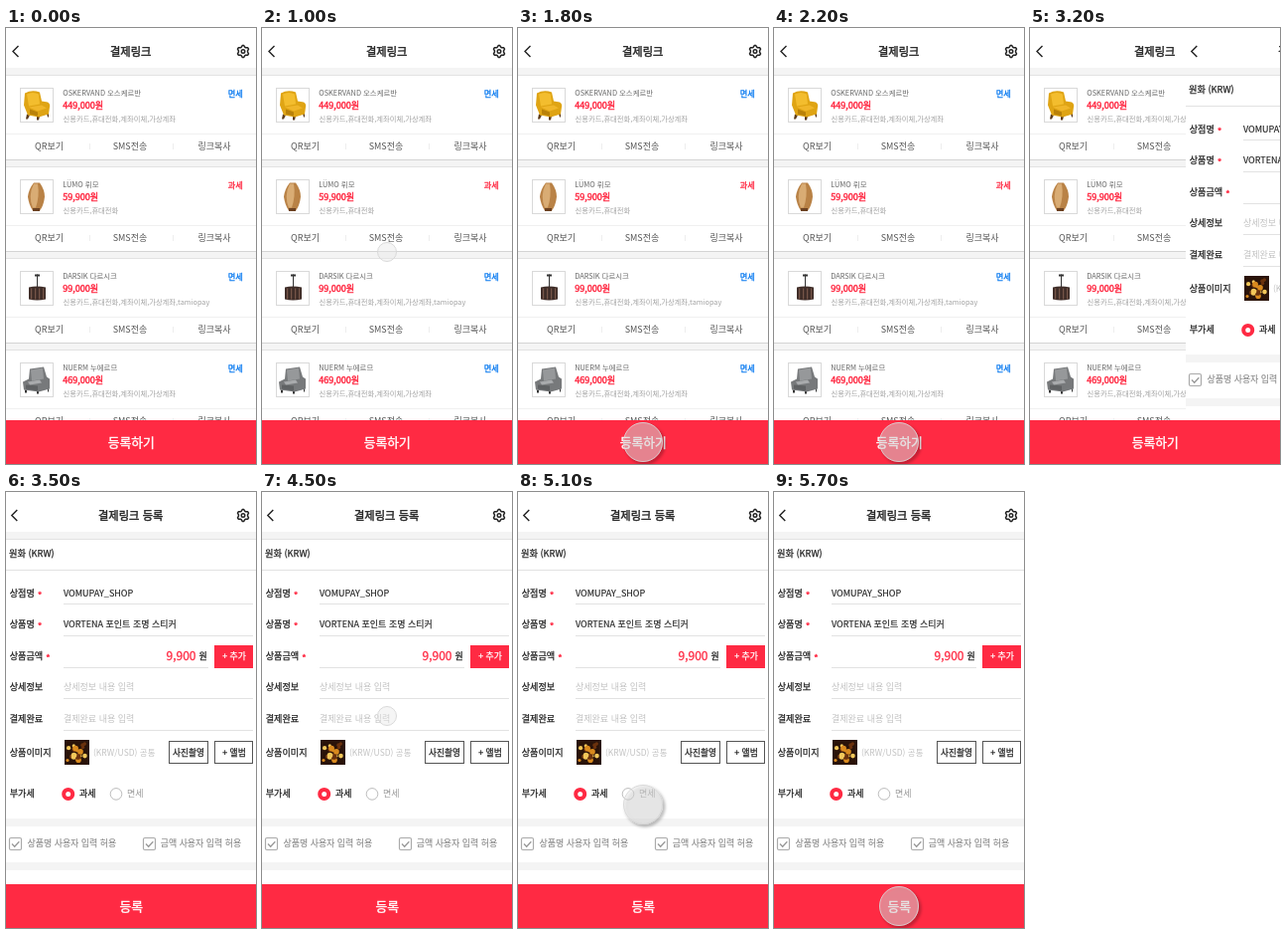
Recreate the animation shown at these times as an HTML page. Size 252 px wide and 438 px high, loop 7.2 s.

```html
<!DOCTYPE html>
<html lang="ko">
<head>
<meta charset="utf-8">
<title>결제링크</title>
<style>
  html, body { margin: 0; width: 100%; height: 100%; overflow: hidden; background: #fff; }
  svg { display: block; width: 252px; height: 438px; overflow: hidden; }
  text { font-family: "Noto Sans CJK KR", "Noto Sans CJK", "Noto Sans CJK JP", "Noto Sans", sans-serif; white-space: pre; }
</style>
</head>
<body>
<svg id="stage" viewBox="0 0 252 438" xmlns="http://www.w3.org/2000/svg">
  <defs>
    <filter id="shade" x="-30%" y="-30%" width="170%" height="170%">
      <feDropShadow dx="2" dy="2.2" stdDeviation="1.5" flood-color="#000" flood-opacity=".5"/>
    </filter>
  </defs>
  <g id="list"></g>
  <g id="form"></g>
  <circle id="tap" cx="126" fill="#e6e6e6" fill-opacity=".42" stroke="#d6d6d6" stroke-opacity=".9"/>
</svg>
<script>
const RED = '#ff2a43', BLUE = '#0f7df0', INK = '#222', GRAY = '#999', PALE = '#c2c2c2', RULE = '#e2e2e2', BAND = '#f4f4f4';
const $ = id => document.getElementById(id);

const rect = (x, y, w, h, fill, more = '') =>
  `<rect x="${x}" y="${y}" width="${w}" height="${h}" fill="${fill}" ${more}/>`;
const path = (d, stroke, width = 1) =>
  `<path d="${d}" fill="none" stroke="${stroke}" stroke-width="${width}"/>`;
const shape = (d, fill) => `<path d="${d}" fill="${fill}"/>`;
const dot = (x, y, r, fill, more = '') => `<circle cx="${x}" cy="${y}" r="${r}" fill="${fill}" ${more}/>`;
const box = (x, y, w, h, stroke) => rect(x + .5, y + .5, w - 1, h - 1, '#fff', `stroke="${stroke}"`);
const rule = (x, y, w, color = RULE) => rect(x, y, w, 1, color);

// y is the vertical middle of the glyphs; heft thickens the regular weight
const text = (x, y, size, str, fill = INK, heft = 0, anchor = 'start') =>
  `<text x="${x}" y="${(y + size * .37).toFixed(2)}" font-size="${size}" fill="${fill}" stroke="${fill}" stroke-width="${heft}" text-anchor="${anchor}">${str}</text>`;
const mid = (x, y, size, str, fill, heft) => text(x, y, size, str, fill, heft, 'middle');

function gear(cx, cy) {
  const pts = [];
  for (let i = 0; i < 24; i++) {
    const a = (i - .5) * Math.PI / 12, r = i % 4 < 2 ? 6 : 4.6;
    pts.push((cx + r * Math.sin(a)).toFixed(2) + ' ' + (cy - r * Math.cos(a)).toFixed(2));
  }
  return `<path d="M${pts.join('L')}Z" fill="none" stroke="${INK}" stroke-width="1.5" stroke-linejoin="round"/>` +
    dot(cx, cy, 1.8, 'none', `stroke="${INK}" stroke-width="1.4"`);
}

const header = (title, backX) =>
  path(`M${backX + 5.5} 18l-5.5 5.5l5.5 5.5`, INK, 1.4) + mid(125.7, 23.4, 11.3, title, INK, .4) + gear(239, 23.5) +
  rect(0, 40, 252, 7, BAND) + rule(0, 47, 252);

const bar = label => rect(0, 394, 252, 44, RED) + mid(126.2, 416.5, 12.8, label, '#fff', .4);

// product pictures, drawn in a 34px square
const pictures = [
  shape('M7 26L6 31H8L10 27ZM17 28V32H19L20 28ZM27 25L28 29H29V24Z', '#5b3a1c') +
  shape('M5 5Q12 1 20 4L22 13L28 14Q31 16 30 19L29 26L19 29L8 27L4 17Z', '#dfa414') +
  shape('M7 6Q13 3 19 6L20 16L9 18Z', '#f3bd2e') + shape('M9 19L22 17L27 20L18 23Z', '#f0b62a') +
  shape('M10 21L18 24V28L10 26Z', '#b98109'),
  shape('M14 3H20Q25 10 25 17Q24 26 20 31H13Q9 25 8 17Q9 9 14 3Z', '#b98246') +
  shape('M14 4H18Q20 16 16 28H13Q8 16 14 4Z', '#d9ac74') + rect(13, 28.5, 7, 3, '#6b4020'),
  rect(17, 3, 1, 13, '#333') + rect(15, 3, 5, 2, '#333') +
  shape('M9 16Q17 14 26 16V28Q17 30 9 28Z', '#3f2d28') +
  [11, 15, 19, 23].map(x => rect(x, 17, 1.2, 11, '#765548')).join(''),
  shape('M5 27V30H7V27ZM17 28V31H19V28ZM28 25V29H29V24Z', '#333') +
  shape('M10 6L24 4L27 14L30 16V26L19 29L4 27L3 19L9 16Z', '#77797b') +
  shape('M11 7L23 5L24 16L12 18Z', '#96989a') + shape('M8 19L20 17L22 20L10 22Z', '#a9abad') +
  shape('M6 22L18 23V28L6 26Z', '#5f6163')
];

const items = [
  ['OSKERVAND 오스케르반', '449,000', '신용카드,휴대전화,계좌이체,가상계좌', true],
  ['LÜMO 뤼모', '59,900', '신용카드,휴대전화', false],
  ['DARSIK 다르시크', '99,000', '신용카드,휴대전화,계좌이체,가상계좌,tamiopay', true],
  ['NUERM 누에르므', '469,000', '신용카드,휴대전화,계좌이체,가상계좌', true]
];

const card = ([name, price, ways, free], i) => `<g transform="translate(0 ${i * 92})">` +
  box(14, 60, 34, 35, '#d9d9d9') + `<g transform="translate(14 60.5)">${pictures[i]}</g>` +
  text(57.2, 65, 7.4, name, '#666') +
  text(57.3, 77.3, 9, price + '원', RED, .45) +
  text(57.5, 91, 7.3, ways, '#a2a2a2') +
  text(223.8, 66, 8.2, free ? '면세' : '과세', free ? BLUE : RED, .3) +
  rule(0, 106, 252, '#f0f0f0') +
  rect(84, 116, 1, 6, '#eee') + rect(168, 116, 1, 6, '#eee') +
  mid(43.5, 118.7, 9, 'QR보기', '#555') + mid(125, 118.7, 9, 'SMS전송', '#555') + mid(210, 118.7, 9, '링크복사', '#555') +
  rect(0, 132, 252, 7, BAND) + rule(0, 132, 252, '#d4d4d4') + rule(0, 139, 252) + '</g>';

const listScreen = () => rect(0, 0, 252, 438, '#fff') + header('결제링크', 7) +
  items.map(card).join('') + bar('등록하기');

const label = (y, str, star) => text(3.7, y, 9.1, str, INK, .25) +
  (star ? text(star, y + 1.6, 9, '*', RED, .4) : '');
const field = (y, str, fill = INK) => text(58, y, 9, str, fill, fill === INK ? .15 : 0);
const check = (x, str, tx) =>
  rect(x + .5, 347.5, 12, 12, '#fff', 'stroke="#aaa" stroke-width="1.2" rx="1.5"') +
  path(`M${x + 3} 353.5l2.7 2.8l4.6-5`, '#999', 1.3) + text(tx, 353, 8.95, str, '#888', .1);

function lights() {
  let seed = 7, out = rect(59, 249, 25, 25, '#2a1309');
  const rnd = () => (seed = seed * 16807 % 2147483647) / 2147483647;
  for (let i = 0; i < 18; i++)
    out += dot((62 + rnd() * 19).toFixed(1), (252 + rnd() * 19).toFixed(1), (1 + rnd() * 2).toFixed(1),
      ['#d98a1e', '#6b320e', '#f2c75a'][i % 3]);
  return out;
}

const formScreen = () => rect(0, 0, 252, 438, '#fff') + header('결제링크 등록', 5.8) +
  text(3, 62, 9.2, '원화 (KRW)', INK, .25) + rule(0, 78, 252) +
  label(102, '상점명', 32) + field(102, 'VOMUPAY_SHOP') + rule(58, 112, 191) +
  label(133, '상품명', 32) + field(133, 'VORTENA 포인트 조명 스티커') + rule(58, 144, 191) +
  label(165, '상품금액', 40.2) + text(191.5, 165, 12, '9,900', RED, .3, 'end') +
  text(194.5, 165, 9, '원', INK, .25) + rule(58, 176, 146) +
  rect(210, 154, 39, 23, RED) + mid(230, 165.2, 8.8, '+ 추가', '#fff', .25) +
  label(196, '상세정보') + field(196, '상세정보 내용 입력', PALE) + rule(58, 207, 191) +
  label(228, '결제완료') + field(228, '결제완료 내용 입력', PALE) + rule(58, 239, 191) +
  label(262, '상품이미지') + lights() + text(88, 261.5, 8.5, '(KRW/USD) 공통', PALE) +
  box(164, 250, 40, 23, '#555') + mid(184, 261.5, 8.7, '사진촬영', INK, .25) +
  box(210, 250, 39, 23, '#555') + mid(230, 261.5, 8.8, '+ 앨범', INK, .25) +
  label(303, '부가세') +
  dot(62.7, 303.4, 4.5, '#fff', `stroke="${RED}" stroke-width="4"`) + text(74, 303, 9, '과세', INK, .25) +
  dot(111, 303.4, 5.8, '#fff', 'stroke="#bbb"') + text(122, 303, 9, '면세', GRAY) +
  rect(0, 328, 252, 8, BAND) + check(3, '상품명 사용자 입력 허용', 21.5) + check(138, '금액 사용자 입력 허용', 155.7) +
  rect(0, 372, 252, 8, BAND) + bar('등록');

// [start, radius, y] of the tap mark; radius 0 hides it
const taps = [[0, 10, 225], [200, 15, 225], [400, 20, 225], [600, 20, 314], [800, 20, 416], [1000, 0, 416], [1200, 20, 416]];

function draw(t) {
  const slide = t < 3200 ? 252 : Math.max(0, 157 - 52 * Math.floor((t - 3200) / 100));
  $('form').setAttribute('transform', `translate(${slide >= 0 && t < 3500 ? slide : 0} 0)`);

  const since = t >= 4500 ? t - 4500 : t < 3200 ? t - 1000 : -1;
  const [, r, y] = taps.filter(k => k[0] <= since).pop() || [0, 0, 0];
  const tap = $('tap');
  tap.setAttribute('visibility', r ? 'visible' : 'hidden');
  tap.setAttribute('r', Math.max(0, r - .5));
  tap.setAttribute('cy', y);
  if (r === 20) tap.setAttribute('filter', 'url(#shade)');
  else tap.removeAttribute('filter');
}

$('list').innerHTML = listScreen();
$('form').innerHTML = formScreen();
const start = performance.now();
function tick() {
  draw((performance.now() - start) % 7200);
  requestAnimationFrame(tick);
}
draw(0);
requestAnimationFrame(tick);
</script>
</body>
</html>
```
